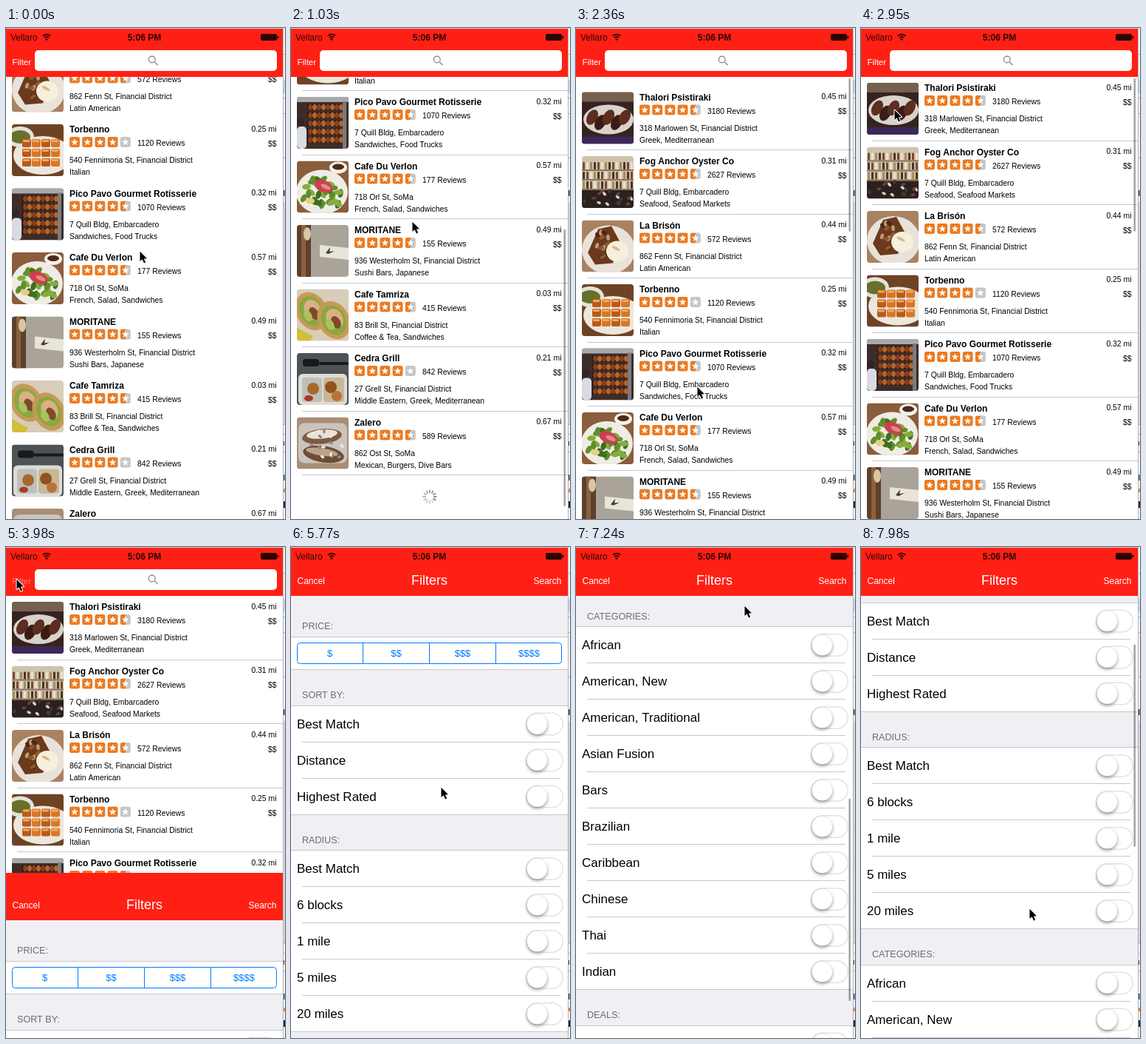
Animation, 378 px wide and 663 px high, one loop 8 s. Source, as an HTML page with a canvas:

```html
<!DOCTYPE html>
<html lang="en">
<head>
<meta charset="utf-8">
<title>Restaurant list and filters</title>
<style>
html, body { margin: 0; height: 100%; overflow: hidden; background: #fff; }
canvas { display: block; width: 378px; height: 663px; }
</style>
</head>
<body>
<canvas id="stage" width="378" height="663"></canvas>
<script>
const ctx = document.getElementById('stage').getContext('2d');
const LOOP = 8000, STEP = 147.7, TOP = 66, ROW = 86.5, CELL = 49;
const RED = '#ff2015', LINE = '#c8c7cc', BLUE = '#007aff';

// ---------- helpers ----------
function box(color, x, y, w, h, r = 0) {
  ctx.fillStyle = color;
  ctx.beginPath();
  ctx.roundRect(x, y, w, h, r);
  ctx.fill();
}
function oval(color, x, y, rx, ry = rx, turn = 0) {
  ctx.fillStyle = color;
  ctx.beginPath();
  ctx.ellipse(x, y, rx, ry, turn, 0, 7);
  ctx.fill();
}
function poly(color, ...pts) {
  ctx.fillStyle = color;
  ctx.beginPath();
  for (let i = 0; i < pts.length; i += 2) ctx.lineTo(pts[i], pts[i + 1]);
  ctx.closePath();
  ctx.fill();
}
function text(str, x, y, size, color = '#000', align = 'left', weight = '') {
  ctx.font = `${weight} ${size}px "Liberation Sans", Arial, sans-serif`;
  ctx.fillStyle = color;
  ctx.textAlign = align;
  ctx.fillText(str, x, y);
}
function inside(x, y, w, h, r, draw) {
  ctx.save();
  ctx.beginPath();
  ctx.roundRect(x, y, w, h, r);
  ctx.clip();
  draw();
  ctx.restore();
}
const rand = n => { const v = Math.sin(n * 127.1) * 43758.5; return v - Math.floor(v); };
function scatter(n, seed, x, y, w, h, size, colors) {
  for (let i = 0; i < n; i++)
    oval(colors[i % colors.length], x + w * rand(seed + i), y + h * rand(seed + i + .5),
      size, size * .6, i);
}
// linear track of [step, value, value...] keys
function track(keys, k) {
  let i = 0;
  while (i < keys.length - 2 && k >= keys[i + 1][0]) i++;
  const a = keys[i], b = keys[i + 1];
  const u = Math.min(1, Math.max(0, (k - a[0]) / (b[0] - a[0])));
  return a.slice(1).map((v, j) => v + (b[j + 1] - v) * u);
}

// ---------- motion, in steps ----------
const cursorPath = [[0, 181, 301], [1, 173, 350], [2, 165, 403], [4, 165, 395], [5, 165, 365],
  [6, 164, 312], [7, 164, 261], [11, 164, 261], [12, 164, 280], [13, 164, 345], [14, 164, 425],
  [15, 164, 484], [17, 164, 484], [18, 150, 400], [19, 110, 268], [20, 45, 110], [21, 5, 22],
  [22, 5, 22], [24, 14, 43], [32, 14, 43], [34, 60, 100], [36, 190, 290], [37, 259, 389],
  [39, 203, 324], [40, 222, 385], [41, 228, 350], [42, 228, 235], [43, 228, 125], [44, 228, 79],
  [49, 228, 79], [50, 228, 112], [51, 228, 200], [52, 228, 315], [53, 228, 415], [54, 228, 488]];
const listScroll = [[3, 203.5], [4, 211], [5, 238], [6, 288], [7, 327], [9, 322], [11, 322],
  [12, 305], [13, 235], [14, 140], [15, 20], [16, -12.5], [17, -6], [18, -2], [19, 0]];
const filterScroll = [[40, 0], [41, 35], [42, 150], [43, 290], [44, 420], [45, 505], [46, 555],
  [47, 582], [48, 593], [49, 595.5], [50, 562], [51, 465], [52, 340], [53, 225], [54, 139]];
const sheetSlide = [[25, 667], [26, 625], [27, 438], [28, 165], [29, 38], [30, 0]];

// ---------- content ----------
const places = [
  ['Thalori Psistiraki', '318 Marlowen St, Financial District', 'Greek, Mediterranean', 3180, 4.5, '0.45'],
  ['Fog Anchor Oyster Co', '7 Quill Bldg, Embarcadero', 'Seafood, Seafood Markets', 2627, 4.5, '0.31'],
  ['La Brisón', '862 Fenn St, Financial District', 'Latin American', 572, 4.5, '0.44'],
  ['Torbenno', '540 Fennimoria St, Financial District', 'Italian', 1120, 4, '0.25'],
  ['Pico Pavo Gourmet Rotisserie', '7 Quill Bldg, Embarcadero', 'Sandwiches, Food Trucks', 1070, 4.5, '0.32'],
  ['Cafe Du Verlon', '718 Orl St, SoMa', 'French, Salad, Sandwiches', 177, 4.5, '0.57'],
  ['MORITANE', '936 Westerholm St, Financial District', 'Sushi Bars, Japanese', 155, 4.5, '0.49'],
  ['Cafe Tamriza', '83 Brill St, Financial District', 'Coffee & Tea, Sandwiches', 415, 4.5, '0.03'],
  ['Cedra Grill', '27 Grell St, Financial District', 'Middle Eastern, Greek, Mediterranean', 842, 4, '0.21'],
  ['Zalero', '862 Ost St, SoMa', 'Mexican, Burgers, Dive Bars', 589, 4.5, '0.67'],
  ['Nonna Vellise', '64 Harn St, Financial District', 'Italian, Pizza', 398, 4, '0.38']
];

// 70 x 70 pictures
const photos = [
  () => {
    box('#35231f', 0, 0, 70, 70);
    box('#76604f', 0, 0, 70, 13);
    oval('#d9d2cc', 36, 37, 34, 20);
    for (let i = 0; i < 5; i++) oval(i % 2 ? '#3b1c14' : '#5b2e1f', 14 + i * 11, 34 + i % 2 * 7, 7, 11, .5);
    box('#3b2858', 0, 60, 70, 10);
  },
  () => {
    box('#cfc3ae', 0, 0, 70, 70);
    for (let r = 0; r < 3; r++) {
      for (let i = 0; i < 14; i++)
        box(['#7b4a2b', '#46352a', '#a98a5a', '#e7e2d6'][(i * 3 + r) % 4], i * 5 + 1, 8 + r * 13, 3, 10, 1);
      box('#8a745c', 0, 18 + r * 13, 70, 2);
    }
    box('#2a211f', 0, 46, 70, 24);
    scatter(16, 9, 2, 46, 66, 20, 3, ['#6d4332', '#d7d0c4', '#41393a']);
  },
  () => {
    box('#a98261', 0, 0, 70, 70);
    oval('#e9e2da', 36, 40, 36, 33);
    poly('#6b3a1c', 8, 44, 22, 12, 40, 8, 52, 30, 42, 58, 18, 60);
    scatter(16, 4, 14, 14, 30, 38, 4, ['#8d5a30', '#4a2614', '#c09a70']);
    oval('#f6efdc', 48, 42, 15, 14);
    oval('#d9b98a', 46, 38, 6, 2, .5);
  },
  () => {
    box('#6e4325', 0, 0, 70, 70);
    oval('#ece7dc', 42, 42, 40, 26);
    oval('#e5e1d6', 11, 17, 19, 14);
    oval('#67702c', 11, 17, 14, 9);
    for (let i = 0; i < 12; i++) {
      const x = 14 + i % 4 * 13, y = 20 + (i >> 2) * 13;
      box(i % 2 ? '#d9762a' : '#b95a1b', x, y, 12, 11, 2);
      box('#efaa58', x + 1, y + 1, 9, 3, 1);
    }
  },
  () => {
    box('#3d2c28', 0, 0, 70, 70);
    box('#a7a9ad', 0, 0, 70, 7);
    for (let r = 0; r < 5; r++) {
      box('#1d1716', 14, 10 + r * 11, 50, 8);
      for (let i = 0; i < 8; i++) oval(i % 2 ? '#b5662b' : '#8b3f1c', 18 + i * 6, 14 + r * 11, 3, 4);
    }
    box('#7b7a80', 62, 6, 5, 64);
    oval('#30252a', 5, 34, 5, 6);
    box('#d9dbe3', 0, 40, 13, 30, 5);
  },
  () => {
    box('#8a5d3c', 0, 0, 70, 70);
    oval('#efece6', 34, 42, 35, 30);
    scatter(34, 2, 8, 22, 52, 38, 6, ['#5f8f2a', '#86ad3b', '#3f6e1f']);
    oval('#c9414e', 36, 34, 13, 8, .4);
    oval('#e08a86', 39, 35, 7, 3, .4);
    oval('#e7cf83', 18, 54, 6, 4);
    oval('#f5f1ea', 56, 9, 12, 8);
    oval('#4a2a1b', 56, 8, 8, 4);
  },
  () => {
    box('#aaa39a', 0, 0, 70, 70);
    box('#5e402b', 0, 0, 19, 70);
    box('#8a6240', 6, 0, 6, 70);
    oval('#d8c7a5', 14, 12, 5, 9);
    poly('#e9e4da', 31, 27, 70, 31, 70, 47, 31, 43);
    poly('#3e3a36', 39, 38, 45, 30, 44, 36, 51, 35, 43, 39);
  },
  () => {
    box('#d8cdb8', 0, 0, 70, 70);
    for (const [x, y] of [[20, 30], [50, 42]]) {
      oval('#c79a56', x, y, 21, 27, -.5);
      oval('#8aa742', x, y, 16, 21, -.5);
      oval('#d9b184', x + 1, y - 2, 11, 14, -.5);
      oval('#7d4a2c', x + 3, y + 3, 6, 9, -.5);
      oval('#a9c25c', x - 5, y + 6, 5, 8, -.5);
    }
    poly('#d4bd39', 0, 52, 22, 64, 18, 70, 0, 70);
  },
  () => {
    box('#4d5354', 0, 0, 70, 70);
    box('#17191a', 30, 12, 40, 4, 2);
    box('#17191a', 8, 8, 22, 10, 4);
    box('#dcdcd8', 2, 28, 66, 42, 6);
    box('#bfc0bb', 7, 33, 27, 33, 4);
    box('#c9b795', 36, 33, 28, 33, 4);
    oval('#a9672a', 22, 48, 8);
    oval('#8f5220', 46, 46, 8);
    oval('#b7743a', 54, 58, 7);
    oval('#a83a22', 16, 61, 6, 4);
  },
  () => {
    box('#a98d74', 0, 0, 70, 70);
    box('#c9c4bd', 2, 8, 66, 54, 8);
    oval('#7d5a40', 34, 26, 27, 10, -.1);
    oval('#e8e2d8', 34, 23, 21, 6, -.1);
    oval('#6d4c35', 36, 50, 28, 11, .15);
    oval('#b8a28a', 34, 47, 22, 5, .15);
    scatter(14, 6, 8, 16, 54, 40, 3, ['#efeae2', '#8d8a86']);
  }
];

function star(x, y, fill) {
  box('#c6c6c6', x, y, 14, 14, 3);
  inside(x, y, 14 * fill, 14, 0, () => box('#ee7a1f', x, y, 14, 14, 3));
  const pts = [];
  for (let i = 0; i < 10; i++) {
    const a = i * Math.PI / 5, r = i % 2 ? 2.1 : 5;
    pts.push(x + 7 + r * Math.sin(a), y + 7.3 - r * Math.cos(a));
  }
  poly('#fff', ...pts);
}

function placeRow(i, y, lined) {
  const [name, address, kinds, reviews, stars, miles] = places[i];
  inside(8, y + 8, 70, 70, 4, () => {
    ctx.translate(8, y + 8);
    photos[i % photos.length]();
  });
  text(name, 86, y + 19, 12, '#000', 'left', 'bold');
  for (let s = 0; s < 5; s++)
    star(86 + s * 17.2, y + 25, Math.min(1, Math.max(0, stars - s)));
  text(reviews + ' Reviews', 178, y + 37, 10.4);
  text(address, 86, y + 60, 10.4);
  text(kinds, 86, y + 76, 10.4);
  text(miles + ' mi', 366.5, y + 17.5, 10.4, '#000', 'right');
  text('$$', 366.5, y + 37.5, 10.4, '#000', 'right');
  if (lined) box(LINE, 15, Math.round(y + ROW) - 1, 360, 1);
}

function spinner(x, y, k) {
  for (let i = 0; i < 12; i++) {
    const a = (i + k * 2) * Math.PI / 6, c = Math.cos(a), s = Math.sin(a);
    ctx.strokeStyle = `rgba(90,90,90,${.25 + .6 * i / 12})`;
    ctx.lineWidth = 1.8;
    ctx.beginPath();
    ctx.moveTo(x + 5 * c, y + 5 * s);
    ctx.lineTo(x + 9.5 * c, y + 9.5 * s);
    ctx.stroke();
  }
}

function scrollbar(scroll, height) {
  const ratio = 599 / height;
  box('rgba(0,0,0,.36)', 369.5, 68 + Math.max(0, scroll) * ratio, 2.5, 599 * ratio, 1.2);
}

function listScreen(k) {
  const [scroll] = track(listScroll, k), loaded = k >= 10;
  box('#fff', 0, TOP, 375, 600);
  const count = loaded ? places.length : 10;
  for (let i = 0; i < count; i++) {
    const y = TOP + i * ROW - scroll;
    if (y > -ROW && y < 663) placeRow(i, y, k >= 4);
  }
  if (!loaded) spinner(188, TOP + 10 * ROW + 29 - scroll, k);
  if (k >= 4 && k < 21) scrollbar(scroll, loaded ? 1735 : 960);
  box(RED, 0, 1, 375, TOP - 1);
  text('Filter', 8.5, 50, 11.5, k >= 26 ? 'rgba(255,255,255,.4)' : '#fff');
  box('#fff', 39, 30, 328, 28, 5);
  ctx.strokeStyle = '#77777c';
  ctx.lineWidth = 1.1;
  ctx.beginPath();
  ctx.arc(197.8, 42.5, 4.4, 0, 7);
  ctx.moveTo(201, 45.7);
  ctx.lineTo(205.5, 50);
  ctx.stroke();
}

// ---------- filters ----------
const sections = [
  ['SORT BY:', ['Best Match', 'Distance', 'Highest Rated']],
  ['RADIUS:', ['Best Match', '6 blocks', '1 mile', '5 miles', '20 miles']],
  ['CATEGORIES:', ['African', 'American, New', 'American, Traditional', 'Asian Fusion', 'Bars',
    'Brazilian', 'Caribbean', 'Chinese', 'Thai', 'Indian']],
  ['DEALS:', ['Offering a Deal']]
];

function group(title, y, height) {
  text(title, 15, y - 10.5, 12.6, '#6d6d72');
  box('#fff', 0, y, 375, height);
  box(LINE, 0, Math.round(y) - 1, 375, 1);
  box(LINE, 0, Math.round(y + height) - 1, 375, 1);
}

function toggle(y) {
  ctx.strokeStyle = '#e3e3e3';
  ctx.lineWidth = 1.5;
  ctx.beginPath();
  ctx.roundRect(318.7, y - 14.7, 49.6, 29.5, 14.7);
  ctx.stroke();
  ctx.save();
  ctx.shadowColor = 'rgba(0,0,0,.35)';
  ctx.shadowBlur = 4;
  ctx.shadowOffsetY = 2.5;
  oval('#fff', 333.5, y, 14);
  ctx.restore();
  ctx.strokeStyle = 'rgba(0,0,0,.12)';
  ctx.lineWidth = .6;
  ctx.beginPath();
  ctx.arc(333.5, y, 14, 0, 7);
  ctx.stroke();
}

function priceControl(y) {
  ctx.strokeStyle = BLUE;
  ctx.lineWidth = 1;
  ctx.beginPath();
  ctx.roundRect(8.5, y + 8, 358, 28, 4);
  for (const x of [97.5, 187.5, 277.5]) {
    ctx.moveTo(x, y + 8);
    ctx.lineTo(x, y + 36);
  }
  ctx.stroke();
  for (let i = 0; i < 4; i++)
    text('$'.repeat(i + 1), 52.5 + 90 * i, y + 26.5, 13, BLUE, 'center');
}

function filterScreen(k) {
  const [scroll] = track(filterScroll, k);
  box('#efeff4', 0, TOP, 375, 610);
  inside(0, TOP, 375, 610, 0, () => {
    let y = 121.5 - scroll;
    group('PRICE:', y, 44);
    priceControl(y);
    y += 93;
    for (const [title, cells] of sections) {
      group(title, y, cells.length * CELL);
      cells.forEach((label, i) => {
        const mid = y + (i + .5) * CELL;
        text(label, 8, mid + 5.5, 17);
        toggle(mid);
        if (i) box(LINE, 15, Math.round(y + i * CELL) - 1, 350, 1);
      });
      y += cells.length * CELL + 48.5;
    }
  });
  if (k >= 41) scrollbar(scroll, 1195 + 118);
  box(RED, 0, 2, 375, TOP - 2);
  text('Cancel', 8.5, 50, 12, '#fff');
  text('Filters', 187.5, 51, 18, '#fff', 'center');
  text('Search', 366.5, 50, 12, '#fff', 'right');
}

// ---------- chrome ----------
function statusBar() {
  const ink = '#2b0503';
  text('Vellaro', 6, 16.5, 12, ink);
  ctx.strokeStyle = ink;
  ctx.lineWidth = 1.7;
  for (const r of [4.6, 7.8]) {
    ctx.beginPath();
    ctx.arc(55, 16.5, r, -2.3, -.84);
    ctx.stroke();
  }
  oval(ink, 55, 15.3, 1.5);
  text('5:06 PM', 187.5, 16.5, 12, ink, 'center', 'bold');
  box(ink, 345, 8, 22, 9, 2);
  box(ink, 367.5, 10.5, 1.8, 4, 1);
}

function windowEdge() {
  box('#d9d2d2', 0, 0, 378, 1);
  box('#f3f3f3', 375, 0, 3, 663);
  box('#b4b4b4', 375, 0, 1, 663);
  box('#c3d7ee', 376, 70, 2, 18);
  for (const y of [35, 94, 115, 175, 535, 548, 572]) box('#b0b0b0', 376, y, 2, 1);
  box('#d6d6d6', 376, 235, 2, 300);
  box('#333', 376, 219, 1.5, 8);
  box('#444', 376, 558, 1, 6);
  box('#2c4a86', 376, 603, 1.5, 8);
  box('#e08a35', 376, 622, 2, 5);
  box('#222', 376, 639, 2, 9);
}

function pointer(x, y) {
  ctx.save();
  ctx.translate(x, y);
  ctx.lineJoin = 'round';
  ctx.strokeStyle = '#fff';
  ctx.lineWidth = 2;
  poly('#000', .5, .8, .5, 14, 3.6, 11.2, 6, 16.6, 8.2, 15.6, 5.9, 10.4, 10, 10.2);
  ctx.stroke();
  ctx.fill();
  ctx.restore();
}

function draw(now) {
  const k = Math.floor(now % LOOP / STEP + .1);
  box('#fff', 0, 0, 378, 663);
  const [slide] = track(sheetSlide, k);
  if (slide > 0) listScreen(k);
  if (slide < 667) {
    ctx.save();
    ctx.translate(0, slide);
    filterScreen(k);
    ctx.restore();
  }
  if (!slide) box(RED, 0, 1, 375, 2);
  statusBar();
  windowEdge();
  pointer(...track(cursorPath, k));
}

let start;
function frame(now) {
  start ??= now;
  draw(now - start);
  requestAnimationFrame(frame);
}
requestAnimationFrame(frame);
</script>
</body>
</html>
```
